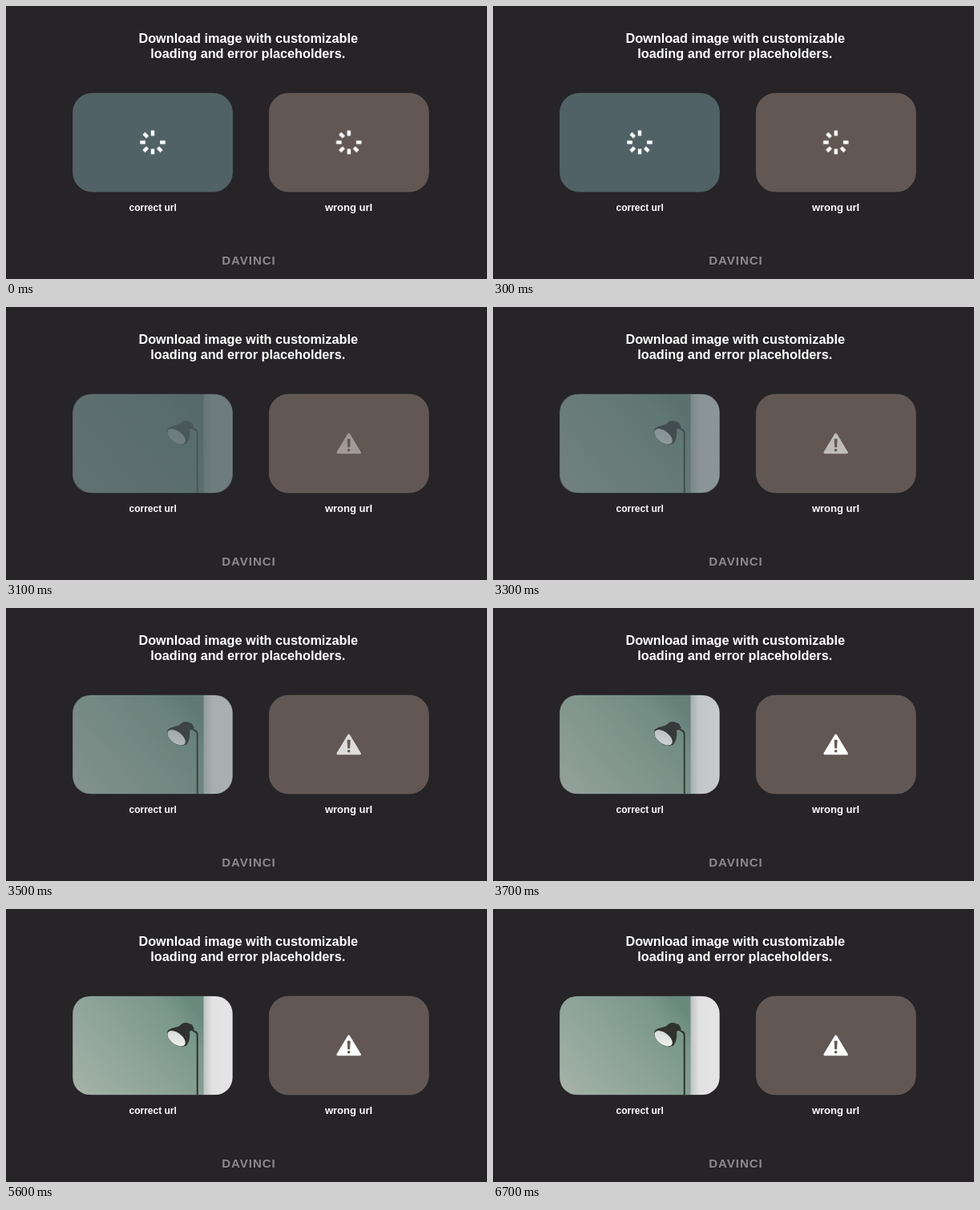
An HTML page that plays this animation: 600 by 341 pixels, repeating every 7200 ms.

```html
<!DOCTYPE html>
<html lang="en">
<head>
<meta charset="utf-8">
<title>Image placeholders</title>
<style>
  html, body { margin: 0; width: 100%; height: 100%; overflow: hidden; background: #262427; }
  svg { display: block; width: 100%; height: 100%; }
  text { font-family: "Liberation Sans", Arial, sans-serif; font-weight: 700; fill: #fff; text-anchor: middle; }
  .title { font-size: 16.25px; }
  .brand { font-size: 15px; letter-spacing: 1px; fill: #8b8a8c; }
</style>
</head>
<body>
<svg viewBox="0 0 600 341">
  <defs>
    <clipPath id="card"><rect x="83.3" y="109" width="199.2" height="123" rx="21"/></clipPath>
    <linearGradient id="wall" x1="0" y1=".9" x2="1" y2=".25">
      <stop offset="0" stop-color="#a4b1a7"/>
      <stop offset=".5" stop-color="#8ca397"/>
      <stop offset=".85" stop-color="#7a988b"/>
      <stop offset="1" stop-color="#6b8a7e"/>
    </linearGradient>
    <linearGradient id="trim">
      <stop offset="0" stop-color="#bfc3c4"/>
      <stop offset=".14" stop-color="#cfd1d2"/>
      <stop offset=".3" stop-color="#e2e2e2"/>
      <stop offset="1" stop-color="#e5e5e5"/>
    </linearGradient>
    <linearGradient id="shade" x2="1" y2="1">
      <stop offset="0" stop-color="#d3d5d4"/>
      <stop offset="1" stop-color="#f3f3f3"/>
    </linearGradient>
    <g id="spinner" fill="#fff"></g>
  </defs>

  <text class="title" x="302.2" y="46">Download image with customizable</text>
  <text class="title" x="301.8" y="65">loading and error placeholders.</text>

  <rect x="83.5" y="109" width="199" height="123" rx="24" fill="#506265" stroke="#5b6b6d" stroke-width=".6"/>
  <rect x="328.3" y="109" width="199" height="123" rx="24" fill="#625753" stroke="#6c625e" stroke-width=".6"/>

  <use id="waitLeft" href="#spinner" x="183" y="170.3"/>
  <use id="waitRight" href="#spinner" x="427.7" y="170.3"/>

  <g id="photo" clip-path="url(#card)">
    <rect x="83" y="109" width="164" height="123" fill="url(#wall)"/>
    <rect x="246.5" y="109" width="37" height="123" fill="url(#trim)"/>
    <g fill="#303130">
      <path d="M229 149 L235.500 153 Q238.700 154 238.700 158 V232" fill="none" stroke="#303130" stroke-width="2"/>
      <path d="M201 153 C206 147 214 149 218 144.500 Q222 141 227 142.500 L232 144.500 L235 150 L229 153 C230 161 228 168 224 171.500 Z"/>
      <ellipse cx="213" cy="161.500" rx="14" ry="8" transform="rotate(38 213 161.5)"/>
      <ellipse cx="212.600" cy="161.800" rx="13" ry="7.200" transform="rotate(38 212.6 161.8)" fill="url(#shade)"/>
    </g>
  </g>

  <g id="warning">
    <path d="M427.600 159 L441.300 181.800 H413.900 Z" fill="#fff" stroke="#fff" stroke-width="3" stroke-linejoin="round"/>
    <path d="M426 165 H429.200 L428.700 175 H426.500 Z" fill="#625753" stroke="#625753" stroke-width=".8" stroke-linejoin="round"/>
    <circle cx="427.600" cy="178.700" r="1.800" fill="#625753"/>
  </g>

  <text x="183.200" y="256" font-size="12">correct url</text>
  <text x="427.500" y="256" font-size="13">wrong url</text>
  <text class="brand" x="303" y="323">DAVINCI</text>
</svg>
<script>
  const LOOP = 7200;
  const byId = id => document.getElementById(id);
  const timing = { duration: LOOP, iterations: Infinity };

  // Seven bars; the upper right place stays empty.
  byId('spinner').innerHTML = [0, 90, 135, 180, 225, 270, 315].map(a =>
    `<rect x="-2.2" y="${a % 180 ? -15.7 : -14.8}" width="4.4" height="6.6" transform="rotate(${a})"/>`
  ).join('');

  // The spinner vanishes at once while the result fades in by tenths.
  function swap(wait, result, start) {
    byId(wait).animate([
      { opacity: 1, easing: 'step-end' },
      { opacity: 0, offset: start / LOOP },
      { opacity: 0 }
    ], timing).startTime = 0;
    byId(result).animate([
      { opacity: 0, easing: 'step-end' },
      { opacity: .1, offset: start / LOOP, easing: 'steps(9, end)' },
      { opacity: 1, offset: (start + 900) / LOOP },
      { opacity: 1 }
    ], timing).startTime = 0;
  }

  swap('waitRight', 'warning', 2800);
  swap('waitLeft', 'photo', 3000);
</script>
</body>
</html>
```
